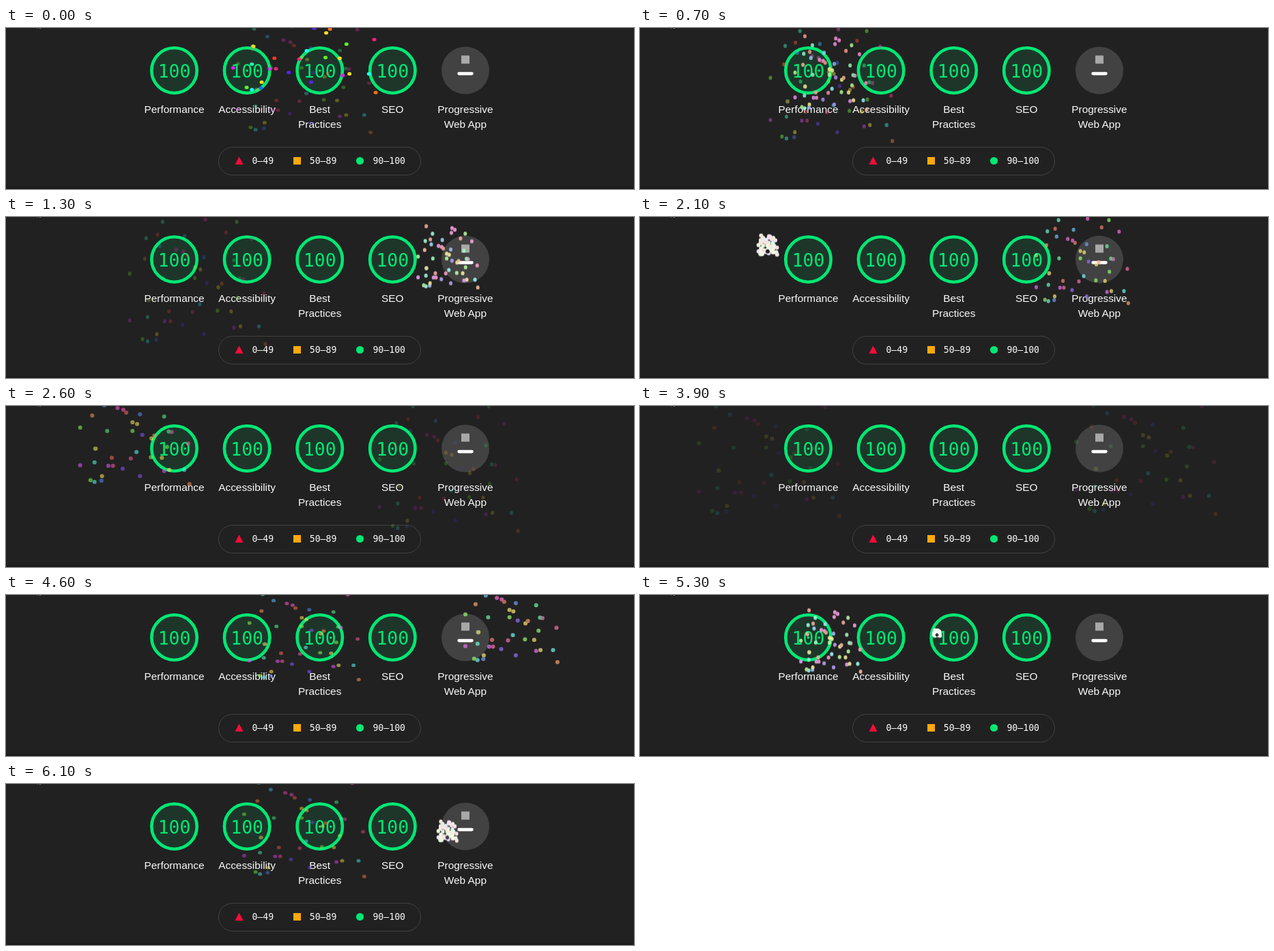
An HTML page for the animation above (6.2 s loop, 920 by 237 pixels).

```html
<!DOCTYPE html>
<html lang="en">
<head>
<meta charset="utf-8">
<title>Score gauges with fireworks</title>
<style>
  html, body { margin: 0; width: 100%; height: 100%; overflow: hidden; background: #212121; }
  #stage { position: relative; width: 920px; height: 237px; overflow: hidden; }
  svg { display: block; }
  .label { font: 15.4px "Liberation Sans", Arial, sans-serif; fill: #fafafa; text-anchor: middle; }
  .score { font: 26.4px "DejaVu Sans Mono", monospace; fill: #00e874; text-anchor: middle; }
  .range { font: 13.2px "DejaVu Sans Mono", monospace; fill: #fafafa; }
  .burst { position: absolute; top: 18.85px; left: 0; width: 5.5px; height: 5.5px; border-radius: 2.75px; }
</style>
</head>
<body>
<div id="stage">
  <svg width="920" height="237">
    <defs>
      <linearGradient id="edge" x2="0" y2="1">
        <stop stop-color="#212121"/><stop offset="1" stop-color="#191919"/>
      </linearGradient>
    </defs>
    <rect y="233" width="920" height="4" fill="url(#edge)"/>
    <path d="M45.500 .5h1M49 .5h2" stroke="#777"/>
    <g id="gauges"></g>
    <circle cx="673" cy="62.500" r="35" fill="#424242"/>
    <rect x="667" y="40.500" width="12" height="12" fill="#a8a8a8"/>
    <rect x="661.300" y="64.700" width="23.500" height="4.800" rx="2.400" fill="#fff"/>
    <rect x="311.500" y="175.500" width="296" height="41" rx="20.500" fill="none" stroke="#424242"/>
    <path d="M341.500 189.500l6 11.500h-12z" fill="#ff0a3c"/>
    <rect x="421" y="190" width="11" height="11" fill="#ffa90a"/>
    <circle cx="518.500" cy="195.500" r="5.600" fill="#00e874"/>
    <text class="range" x="360.400" y="200">0–49</text>
    <text class="range" x="444.700" y="200">50–89</text>
    <text class="range" x="537.400" y="200">90–100</text>
  </svg>
</div>
<script>
const LOOP = 6200, STEP = 100, ZOOM = 1.1;
const AGE = 980;  // how far the bursts have run when the loop begins
const LEAD = 22;  // the fall runs slightly ahead of the spread

const labels = [["Performance"], ["Accessibility"], ["Best", "Practices"], ["SEO"], ["Progressive", "Web App"]];
document.getElementById("gauges").innerHTML = labels.map((lines, i) => {
  const x = 246.5 + i * 106.6;
  const ring = i === 4 ? "" :
    `<circle cx="${x}" cy="62.5" r="33.2" fill="#00e874" fill-opacity=".1" stroke="#00e874" stroke-width="4.6"/>
     <text class="score" x="${x}" y="73">100</text>`;
  return ring + lines.map((s, row) => `<text class="label" x="${x}" y="${125 + row * 22}">${s}</text>`).join("");
}).join("");

// Spark end points (x, y pairs) by hue.
const sparks = {
  7: [42, -123.7, -38, -12.7, -13, -91.7, -67, -162.7, -54, -120.7],
  22: [36, -51.7, 97, 33.3, -72, -86.7],
  53: [-2, -74.7, 62, 8.3, -66, -28.7, 31, -46.7, -55, 19.3, 49, -12.7, 6, -71.7],
  102: [58, -31.7, 57, -138.7, -93, -65.7, 30, -13.7, -2, -59.7, -75, 26.3],
  141: [53, -84.7, 61, -58.7, -46, -59.7],
  162: [-70, -115.7, -47, -138.7, -68, -4.7],
  180: [5, -22.7, -68, 29.3, 88, 8.3],
  202: [-51, -104.7, -16, -118.7, -67, -28.7],
  221: [-56, 27.3, 11, -88.7],
  256: [-19, 6.3, 15, -52.7, 11, 19.3],
  293: [-93, 0.3, -44, 1.3, 53, 10.3],
  317: [-28, -99.7, 13, -141.7, 24, -151.7, 66, -57.7, 78, -114.7, 15, -156.7, -18, -96.7],
  335: [-36, 1.3, -5, -11.7, 95, -37.7]
};
const spread = [];
for (const hue in sparks)
  for (let i = 0; i < sparks[hue].length; i += 2)
    spread.push(`${sparks[hue][i] * ZOOM}px ${sparks[hue][i + 1] * ZOOM}px hsl(${hue}, 92%, 55%)`);
const packed = spread.map(() => "0px 0px #fff");

// Margin left and top of successive bursts, in percent.
const places = [[47, 4], [29.99, 7], [69.99, 6], [20, 3], [80, 3]];

function makeBurst(duration) {
  const el = document.createElement("div");
  el.className = "burst";
  document.getElementById("stage").append(el);
  const play = (frames, easing) => {
    const anim = el.animate(frames, { duration, easing, iterations: Infinity });
    anim.pause();
    return anim;
  };
  const bang = play({ boxShadow: [packed.join(), spread.join()] }, "ease-out");
  const fall = play({ transform: ["translateY(0px)", `translateY(${80 * ZOOM}px)`], opacity: [1, 0] }, "ease-in");
  return age => {
    const [left, top] = places[Math.floor(age / duration) % places.length];
    el.style.marginLeft = left + "%";
    el.style.marginTop = top + "%";
    bang.currentTime = age;
    fall.currentTime = age + LEAD;
  };
}

const bursts = [makeBurst(1000), makeBurst(1250)];
function draw() {
  const t = Math.floor(performance.now() % LOOP / STEP) * STEP;
  bursts.forEach(show => show(t + AGE));
  requestAnimationFrame(draw);
}
draw();
</script>
</body>
</html>
```
